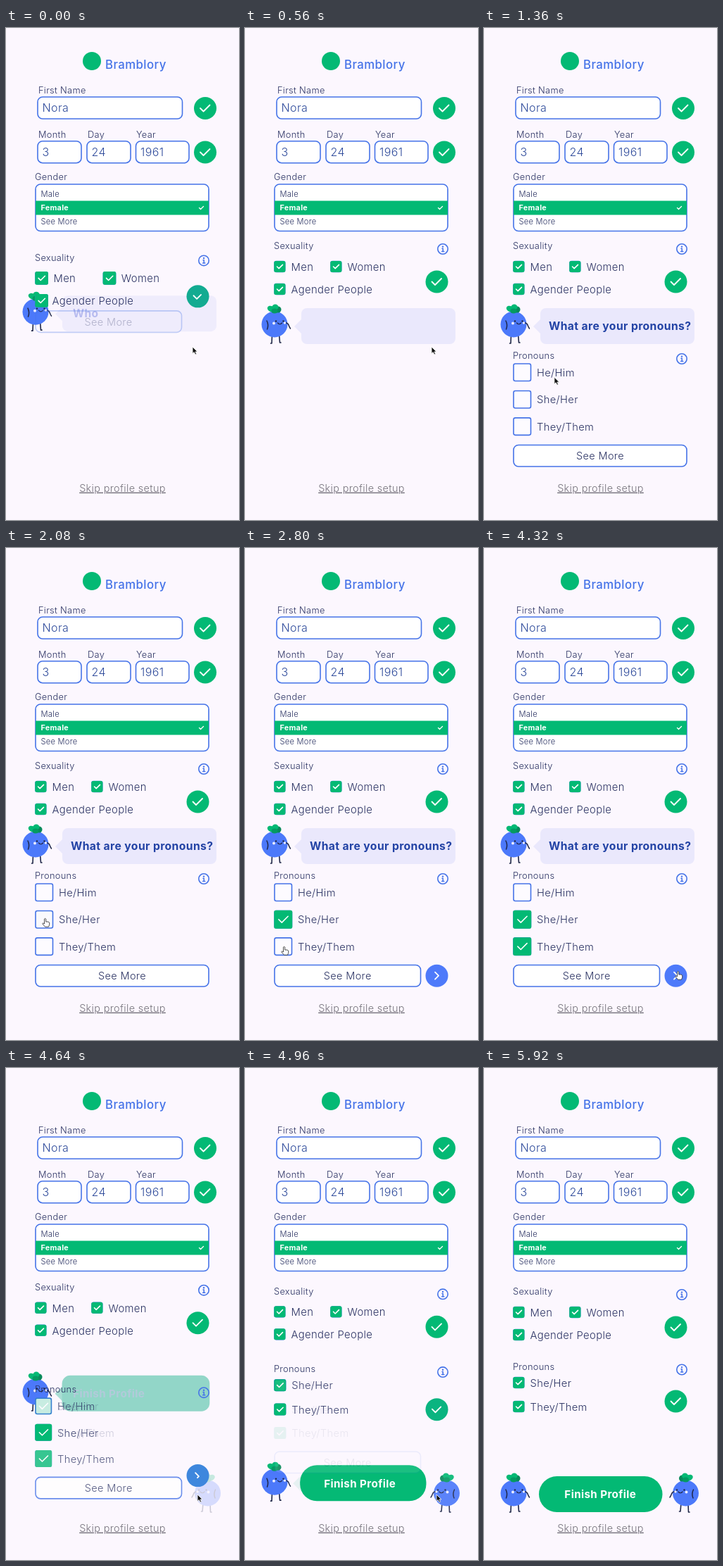
These frames come from a looping animation (331 by 699 pixels, 6 s). An HTML page:

```html
<!DOCTYPE html>
<html lang="en">
<head>
<meta charset="utf-8">
<title>Profile setup</title>
<style>
html, body { margin: 0; width: 100%; height: 100%; overflow: hidden; background: #fcf7fe; }
svg { display: block; width: 100vw; height: 100vh; }
text { font-family: Inter, "Open Sans", sans-serif; letter-spacing: .025em; white-space: pre; }
</style>
</head>
<body>
<svg id="stage" viewBox="0 0 331 699"></svg>
<script>
const LOOP = 6000;
const BLUE = [78, 122, 250], GREEN = [3, 185, 116], LAVENDER = [234, 232, 252], WHITE = [255, 255, 255];
const INK = '#2b3363', VALUE = '#304c9c', LINE = '#4573e8', BERRY = '#4c79fa', LIMB = '#1f2748', LEAF = '#03b974';
const stage = document.getElementById('stage');

const clamp = v => Math.max(0, Math.min(1, v));
const lerp = (a, b, k) => a + (b - a) * k;
const span = (t, from, to) => clamp((t - from) / (to - from));
const easeOut = k => 1 - (1 - k) ** 2;
const easeInOut = k => k * k * (3 - 2 * k);
const mix = (a, b, k) => `rgb(${a.map((v, i) => Math.round(lerp(v, b[i], k)))})`;

const group = (content, opacity = 1, transform = '') =>
  opacity > 0 ? `<g opacity="${opacity}" transform="${transform}">${content}</g>` : '';
const line = (d, color, width) =>
  `<path d="${d}" fill="none" stroke="${color}" stroke-width="${width}" stroke-linecap="round" stroke-linejoin="round"/>`;
const rect = (x, y, w, h, r, fill, stroke = 'none') =>
  `<rect x="${x}" y="${y}" width="${w}" height="${h}" rx="${r}" fill="${fill}" stroke="${stroke}" stroke-width="1.6"/>`;
const dot = (x, y, r, fill) => `<circle cx="${x}" cy="${y}" r="${r}" fill="${fill}"/>`;

// y is the middle of the capitals
function label(str, x, y, size = 12.8, { fill = INK, weight = 300, anchor = 'start', extra = '' } = {}) {
  return `<text x="${x}" y="${y + size * 0.36}" font-size="${size}" font-weight="${weight}" fill="${fill}" text-anchor="${anchor}" ${extra}>${str}</text>`;
}

function field(x, y, w, value) {
  return rect(x, y, w, 31, 7, '#fff', LINE) + label(value, x + 6.5, y + 15.7, 16, { fill: VALUE });
}

// k: 0 is a blue chevron, 1 a green tick
function roundButton(x, y, k = 1) {
  const from = [[-2.5, -5], [2.5, 0], [-2.5, 5]], to = [[-7, 0], [-2.5, 4.5], [6.5, -4.5]];
  const d = 'M' + from.map((p, i) => p.map((v, j) => lerp(v, to[i][j], k)).join()).join('L');
  return group(dot(0, 0, 16, mix(BLUE, GREEN, k)) + line(d, '#fff', 1.8), 1, `translate(${x} ${y})`);
}

function checkbox(x, y, size, on) {
  const s = size / 25;
  return rect(x, y - size / 2, size, size, 2.5, '#fdfbff', LINE) +
    group(rect(x - .7, y - size / 2 - .7, size + 1.4, size + 1.4, 2.5, LEAF) +
      line(`M${x + 6 * s},${y}l${4.5 * s},${4.5 * s}l${9 * s},${-9 * s}`, '#fff', 1.6), on);
}

function info(y) {
  return `<circle cx="281" cy="${y}" r="7.2" fill="none" stroke="${LINE}" stroke-width="1.6"/>` +
    dot(281, y - 3.4, 1.2, LINE) + line(`M280,${y - .7}h1.2v4.2m-1.6,0h3.2`, LINE, 1.5);
}

function mascot(x, y, flip, opacity = 1) {
  const leaf = (cx, cy, rx, ry, turn, fill) =>
    `<ellipse rx="${rx}" ry="${ry}" fill="${fill}" transform="translate(${cx} ${cy}) rotate(${turn})"/>`;
  return group(
    line('M-3.5,15L-4,27h-1.5M6.5,14L7.5,26h1.5', LIMB, 1.6) +
    dot(0, 0, 18.5, BERRY) +
    leaf(5, -21, 4.5, 4.5, 0, '#078a5a') + leaf(-5, -22, 5.5, 4, 25, LEAF) +
    leaf(1, -24.5, 4.5, 4, 0, LEAF) + leaf(0, -19, 4.5, 3.5, 0, '#059a62') +
    line('M-11,-5Q-8,1 -10.5,7M16,-2Q19,-2 20,1T22.5,6', LIMB, 1.5) +
    dot(-1, -1.5, 2, '#e9ecff') + dot(14.5, -2, 1.7, '#e9ecff') +
    dot(2, -4.5, 1.2, LIMB) + dot(12.5, -4.5, 1.2, LIMB) + line('M4.5,-2Q7.5,1.5 10.5,-2', LIMB, 1.2),
    opacity, `translate(${x} ${y}) scale(${flip ? -1 : 1} 1)`);
}

function header() {
  return dot(122, 47, 13, LEAF) +
    label('Bramblory', 141, 51.5, 16.8, { fill: LINE, weight: 500 }) +
    label('First Name', 46, 88.5) + field(45, 98, 205.5, 'Nora') + roundButton(283, 114) +
    label('Month', 46, 151) + label('Day', 116, 151) + label('Year', 185, 151) +
    field(45, 160.7, 62, '3') + field(115, 160.7, 62, '24') + field(184.5, 160.7, 75.5, '1961') + roundButton(283, 176.5) +
    label('Gender', 41, 211.5) + rect(42, 222, 246, 66.5, 7, '#fff', LINE) +
    rect(42, 245.5, 246, 20, 0, LEAF) +
    label('Male', 49.5, 235.7, 11.2) + label('Female', 49.5, 255.4, 10.8, { fill: '#fff', weight: 700 }) +
    label('See More', 49.5, 275.5, 11.1) + line('M274.5,255.5l2,2l4,-4', '#fff', 1.3) +
    label('Skip profile setup', 165.5, 653.5, 14.4, { fill: '#77747d', anchor: 'middle', extra: 'text-decoration="underline"' });
}

function sexuality(rest, out) {
  const dy = 16.5 * rest + 8 * out, size = 14.7 + 2.5 * rest, womenX = 122 + 16.5 * rest;
  return label('Sexuality', 41, 309.7 + dy) + info(314 + dy) +
    checkbox(42, 339 + dy, size, 1) + label('Men', 65.5 + 2 * rest, 339.5 + dy, 14.8) +
    checkbox(womenX, 339 + dy, size, 1) + label('Women', womenX + 23.5 + 2 * rest, 339.5 + dy, 14.8) +
    checkbox(42, 371 + dy, size, 1) + label('Agender People', 65.5, 371.5 + dy, 14.8) +
    roundButton(272.5, 360.5 + 21 * rest + 8 * out, 1 - .22 * rest);
}

function speech(t, rest, out) {
  const x = lerp(80, 78, out), y = 398 - 18 * rest + 182 * out, w = lerp(219, 175.5, out);
  const tint = easeOut(out), fill = mix(LAVENDER, GREEN, tint);
  const shape = group(
    group(`<path d="M${x + 1},${y + 15}L${x - 10},${y + 26}L${x + 1},${y + 37}z" fill="${fill}"/>`, 1 - out) +
    rect(x, y, w, 51, lerp(8, 25.5, out), fill), 1 - .3 * rest);
  const words = 'What are your pronouns?'.split(' ');
  const spoken = words.slice(0, Math.max(0, Math.floor((t - 620) / 110))).join(' ');
  return shape +
    group(label('Who', 95, 405 + 18 * (1 - rest), 15.5, { fill: '#b7bbef', weight: 700 }), rest) +
    (out ? label('Finish Profile', lerp(141, 165.3, out), y + 26, 15.2,
      { fill: mix([130, 170, 195], WHITE, tint), weight: 700, anchor: 'middle' })
      : label(spoken, 92, 423.7, 15.7, { fill: '#2343a5', weight: 700 })) +
    mascot(42, 421 - 18 * rest + 183 * out) + mascot(286.5, 604, true, out);
}

function pronouns(t, out) {
  const shown = span(t, 1080, 1300);
  const grow = easeOut(span(t, 2100, 2400));
  const picked = [out, span(t, 2080, 2180), span(t, 2960, 3060)];
  const names = ['He/Him', 'She/Her', 'They/Them'];
  const ends = [447, 481, 514];
  const size = lerp(24.5, 14.7, out), textX = lerp(75, 65.5, out);
  const rows = names.map((name, i) => {
    const y = lerp(489.3 + 38.4 * i, ends[i], out);
    const next = names[i + 1];
    return group(checkbox(42, y, size, picked[i]), i == 2 ? 1 - out : 1) +
      group(label(name, textX, y + .5, 14.7), 1 - out) +
      (next ? group(label(next, textX, y + .5, 14.7), out) : '');
  }).join('');
  const w = lerp(246, 207.5, grow), y = 592.5 - 52 * out;
  const more = rect(42, y, w, 30.5, 7, '#fff', LINE) +
    label('See More', 42 + w / 2, y + 15.5, 14.5, { anchor: 'middle' });
  return group(
    label('Pronouns', 41, lerp(465.3, 424, out)) + info(lerp(470, 428.5, out)) + rows +
    group(more, 1 - out) + group(roundButton(272.5, lerp(607.7, 473.5, out), out), grow), shown);
}

function cursor(t) {
  if (t > 5200) return '';
  const stops = [[0, 265, 453], [900, 265, 453], [1400, 97, 497], [1750, 56, 529], [2350, 56, 529],
    [2750, 56, 569], [3120, 56, 569], [3600, 276, 604], [4560, 276, 604], [4640, 272, 606], [LOOP, 272, 606]];
  const i = stops.findIndex(s => s[0] > t);
  const [t0, x0, y0] = stops[i - 1], [t1, x1, y1] = stops[i];
  const k = easeInOut(span(t, t0, t1));
  const hand = t > 1580 && t < 4580;
  const d = hand
    ? 'M-1.5,-2q1.3,-1.4 2.2,0v4q4,-.6 5,1.2v3l-1.2,3h-5l-3.8,-4.5q.2,-1.6 2.8,.2z'
    : 'M0,0v9.5l2.2,-2l1.7,3.5l1.7,-.8l-1.6,-3.3h3z';
  return `<path d="${d}" transform="translate(${lerp(x0, x1, k)} ${lerp(y0, y1, k)})" fill="${hand ? '#fff' : '#111'}" stroke="${hand ? '#222' : '#fff'}" stroke-width=".8"/>`;
}

function seeMoreLeaving(rest) {
  const y = 402 - 20 * (1 - rest);
  return group(rect(42, y, 207.5, 30.5, 7, 'none', LINE) +
    label('See More', 145.5, y + 16, 14.5, { anchor: 'middle' }), .32 * rest);
}

const fixed = header();

function draw(t) {
  const rest = (1 - span(t, 0, 270)) ** 2;
  const out = easeOut(span(t, 4580, 5120));
  stage.innerHTML = fixed + speech(t, rest, out) + seeMoreLeaving(rest) +
    sexuality(rest, out) + pronouns(t, out) + cursor(t);
}

const start = performance.now();
function tick() {
  draw((performance.now() - start) % LOOP);
  requestAnimationFrame(tick);
}
tick();
</script>
</body>
</html>
```
